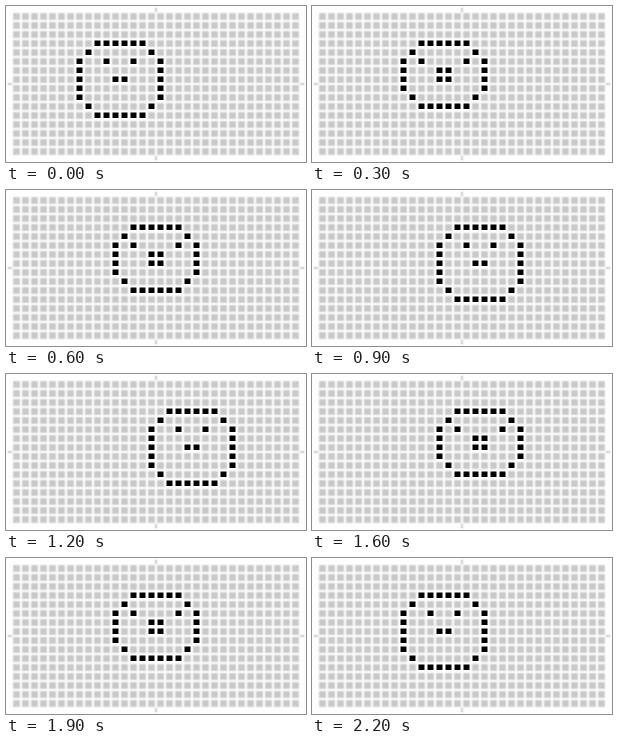
An HTML page with a canvas for the animation above (2400 ms loop, 300 px wide and 156 px high).

```html
<!DOCTYPE html>
<html lang="en">
<head>
<meta charset="utf-8">
<title>Dot matrix face</title>
<style>
html, body { margin: 0; width: 100%; height: 100%; overflow: hidden; background: #fefefe; }
canvas { display: block; }
</style>
</head>
<body>
<canvas id="stage" width="300" height="156"></canvas>
<script>
const ctx = document.getElementById('stage').getContext('2d');
const WIDTH = 300, HEIGHT = 156;
const COLS = 32, ROWS = 16, PITCH = 9, MARGIN = 6, LOOP = 2400;
const PAPER = '#fefefe', ON = '#000';
const HALO = '#f3f3f3', EDGE = '#dadada', CORE = '#c9c9c9';

const TALL = [
  '..######..',
  '.#......#.',
  '#..#..#..#',
  '#........#',
  '#...##...#',
  '#........#',
  '#........#',
  '.#......#.',
  '..######..'
];
const SQUASHED = [
  '..######..',
  '.#......#.',
  '#.#....#.#',
  '#...##...#',
  '#...##...#',
  '#........#',
  '.#......#.',
  '..######..'
];

// start time, left column, shape
const STEPS = [
  [0, 7, TALL],
  [300, 9, SQUASHED],
  [600, 11, SQUASHED],
  [900, 13, TALL],
  [1200, 15, TALL],
  [1600, 13, SQUASHED],
  [1900, 11, SQUASHED],
  [2200, 9, TALL]
];
const TOP_ROW = 3;

function box(x, y, w, h, radius, color) {
  ctx.fillStyle = color;
  ctx.beginPath();
  ctx.roundRect(x, y, w, h, radius);
  ctx.fill();
}

// soft-edged grey dot
function offCell(x, y) {
  box(x, y, 9, 9, 2, HALO);
  box(x + 1, y + 1, 7, 7, 1.5, EDGE);
  box(x + 2, y + 2, 5, 5, 0, CORE);
}

function onCell(x, y) {
  box(x + 1.5, y + 1.5, 6, 5.5, 0, ON);
}

function mark(cx, cy, w, h) {
  box(cx - w / 2 - 1, cy - h / 2 - 1, w + 2, h + 2, 1, HALO);
  box(cx - w / 2, cy - h / 2, w, h, 0, EDGE);
}

function drawBoard(isLit) {
  box(0, 0, WIDTH, HEIGHT, 0, PAPER);
  for (const x of [4, WIDTH - 4]) mark(x, HEIGHT / 2, 4, 2);
  for (const y of [4, HEIGHT - 4]) mark(WIDTH / 2, y, 2, 4);
  for (let row = 0; row < ROWS; row++) {
    for (let col = 0; col < COLS; col++) {
      const cell = isLit(col, row) ? onCell : offCell;
      cell(MARGIN + col * PITCH, MARGIN + row * PITCH);
    }
  }
}

function draw(time) {
  const t = time % LOOP;
  const [, left, shape] = STEPS.filter(step => step[0] <= t).pop();
  drawBoard((col, row) => {
    const line = shape[row - TOP_ROW];
    return line !== undefined && line[col - left] === '#';
  });
}

const start = performance.now();
function tick() {
  draw(performance.now() - start);
  requestAnimationFrame(tick);
}
tick();
</script>
</body>
</html>
```
